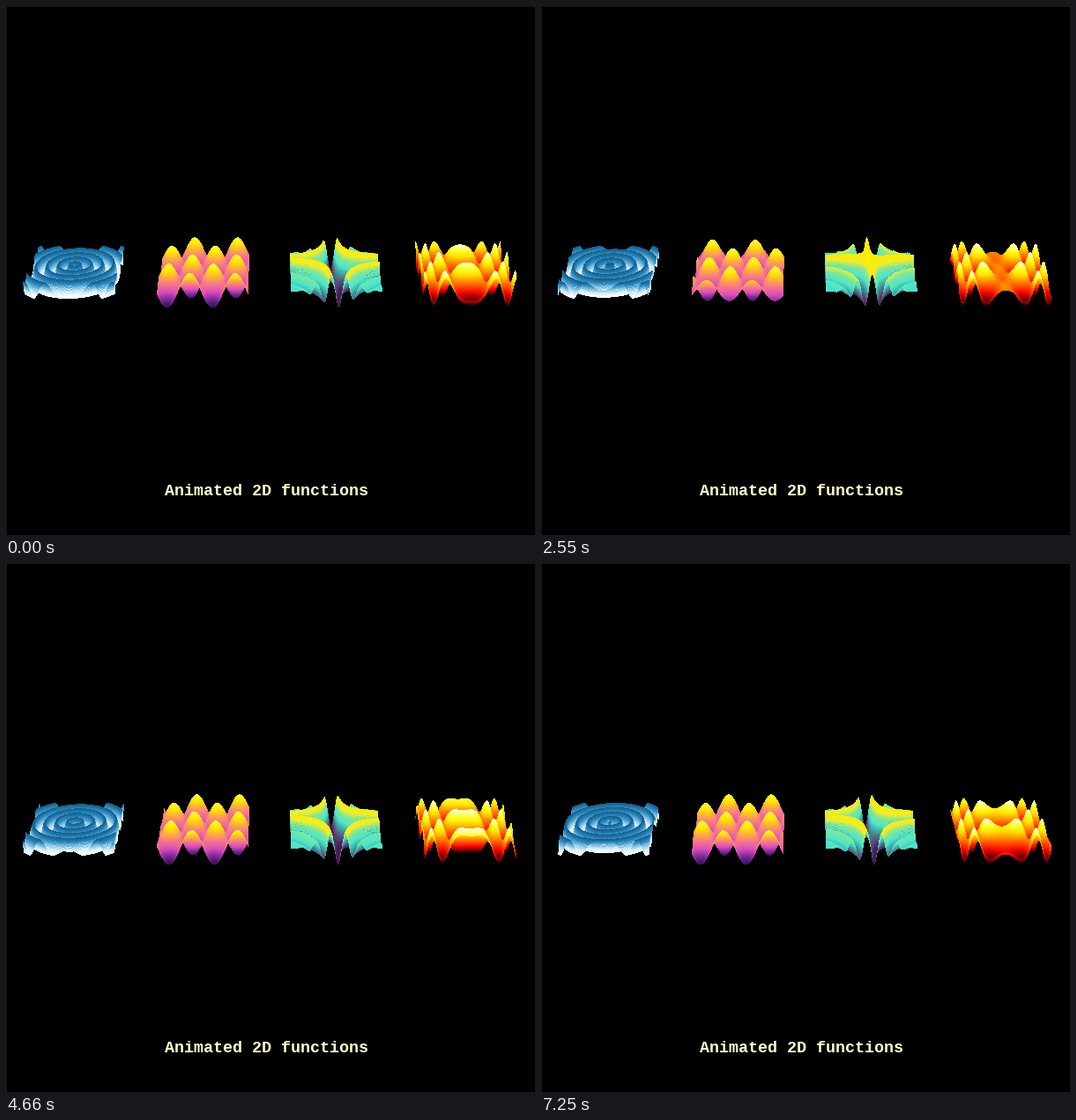
A matplotlib script for the animation above (7280 ms loop, 600 by 600 pixels).

```python
import numpy as np
import matplotlib.pyplot as plt
from matplotlib.animation import FuncAnimation
from matplotlib.colors import LinearSegmentedColormap

SIZE, DPI = 600, 100
LOOP, STEP = 7280, 40
TOP, HEIGHT = 250, 100          # strip of the stage that holds the surfaces
MID_X, MID_Y = 298.5, 300
HALF, GAP, TILT, DEPTH = 50, 147.2, 21, 0.034
TAU = 2 * np.pi

# Phase of each wave in cycles
KEYS = [0, 1820, 3170, 4040, 5370, 6250, 7250, 7280]
RIPPLE = [0, 2.0, 3.5, 4.5, 6.07, 7.1, 8.5, 8.54]
DRIFT = [0, 1.17, 2.0, 2.64, 3.54, 4.19, 4.98, 5.0]
CHIRP = [0.056, 1.27, 2.17, 3.0, 4.0, 4.84, 5.84, 5.88]


def rings(x, y, t):
    return -np.cos(TAU * (4 * np.hypot(x, y) - np.interp(t, KEYS, RIPPLE)))


def bumps(x, y, t):
    p = np.interp(t, KEYS, DRIFT)
    sway = 0.075 * (1 - np.cos(TAU * (p - 0.085)))
    return -np.cos(TAU * (x + 0.78 - p)) * np.cos(TAU * (y + 1 + sway))


def saddle(x, y, t):
    p = np.interp(t, KEYS, DRIFT) + 0.36
    u = x * y
    return np.cos(TAU * (u / 0.325 - p)) * np.exp(-(u / 0.45) ** 2)


def lens(x, y, t):
    p = np.interp(t, KEYS, CHIRP)
    return np.cos(9 * x * x + TAU * p) * np.cos(TAU * (y - 0.62))


def ramp(*stops):
    cmap = LinearSegmentedColormap.from_list("ramp", stops)
    return (cmap(np.linspace(0, 1, 256))[:, :3] * 255).astype(np.uint8)


class Surface:
    """Height field in perspective, painted from back to front."""

    def __init__(self, slot, func, amp, colors):
        self.func, self.colors = func, colors
        y = np.linspace(1, -1, 320)[:, None]
        px = np.arange(SIZE)[None, :]
        scale = 1 / (1 + DEPTH * y)
        x = ((px - MID_X) / scale - GAP * (slot - 1.5)) / HALF
        inside = np.abs(x) <= 1

        def pick(a):
            return np.broadcast_to(a, x.shape)[inside]

        self.x, self.y, self.px = x[inside], pick(y), pick(px)
        self.base = pick(MID_Y - TOP - TILT * y * scale)
        self.lift = pick(amp * scale)

    def paint(self, img, t):
        z = self.func(self.x, self.y, t)
        row = np.rint(self.base - self.lift * z).astype(int)
        rgb = self.colors[np.clip((z + 1) * 127.5, 0, 255).astype(int)]
        img[row + 1, self.px] = rgb
        img[row, self.px] = rgb


surfaces = [
    Surface(0, rings, 8, ramp(
        (0, "#ffffff"), (0.25, "#d6eef8"), (0.5, "#7cc0e2"),
        (0.75, "#2f8cc0"), (1, "#14608f"))),
    Surface(1, bumps, 18, ramp(
        (0, "#3a1460"), (0.15, "#7d2a9c"), (0.33, "#dc4cba"),
        (0.52, "#f8768c"), (0.7, "#ffb03c"), (0.85, "#ffe600"),
        (1, "#fff83c"))),
    Surface(2, saddle, 18, ramp(
        (0, "#46184e"), (0.15, "#5c4a78"), (0.32, "#409c9c"),
        (0.5, "#4ce6cc"), (0.68, "#7ce6a0"), (0.84, "#f0ee28"),
        (1, "#ffec00"))),
    Surface(3, lens, 18, ramp(
        (0, "#200000"), (0.12, "#8c0000"), (0.27, "#ff0800"),
        (0.5, "#ff7a00"), (0.7, "#ffe400"), (0.84, "#ffff28"),
        (1, "#ffffe0"))),
]

fig = plt.figure(figsize=(SIZE / DPI, SIZE / DPI), dpi=DPI, facecolor="black")
ax = fig.add_axes([0, 1 - (TOP + HEIGHT) / SIZE, 1, HEIGHT / SIZE])
ax.axis("off")
view = ax.imshow(np.zeros((HEIGHT, SIZE, 3), np.uint8),
                 interpolation="nearest", aspect="auto")

fig.text(296 / SIZE, 45 / SIZE, "Animated 2D functions", color="#ffffcc",
         family="Liberation Mono", weight="bold", size=13.2,
         ha="center", va="baseline")
edge = dict(facecolor="#1a1a06", edgecolor="none", transform=None, antialiased=False)
fig.add_artist(plt.Rectangle((0, 0), 1, SIZE, **edge))
fig.add_artist(plt.Rectangle((0, SIZE - 1), SIZE, 1, **edge))


def draw(i):
    img = np.zeros((HEIGHT, SIZE, 3), np.uint8)
    for s in surfaces:
        s.paint(img, i * STEP)
    view.set_data(img)
    return [view]


anim = FuncAnimation(fig, draw, frames=LOOP // STEP, interval=STEP,
                     repeat=True, repeat_delay=0)
plt.show()
```
